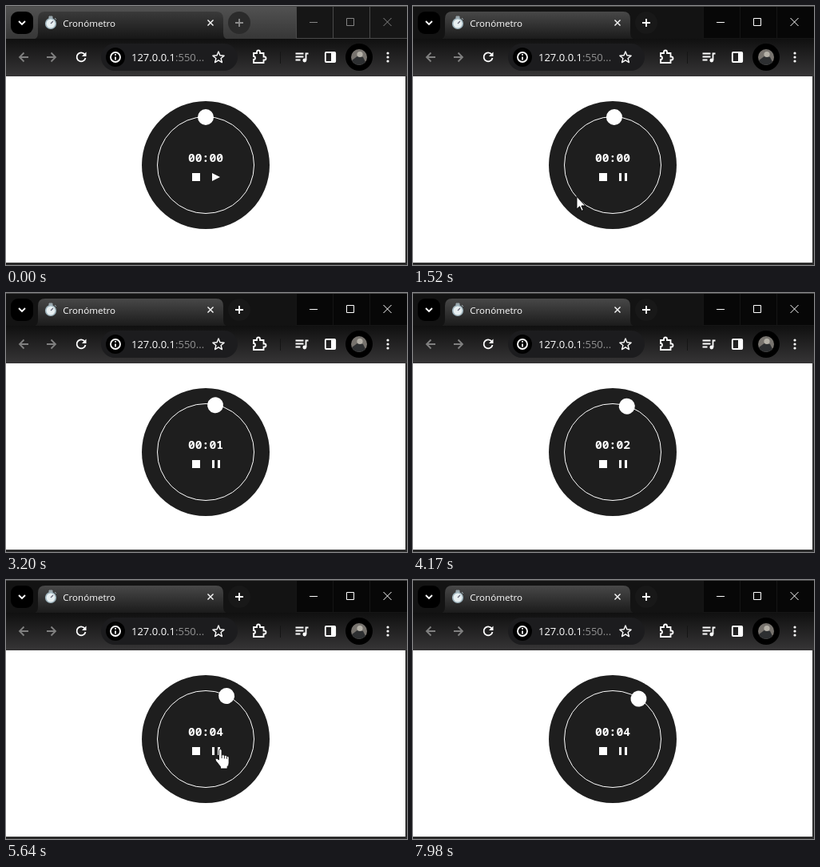
Write an HTML page that moves like this. It is 502 by 324 pixels and loops after 8 s.

```html
<!DOCTYPE html>
<html lang="es">
<head>
<meta charset="utf-8">
<title>Cronómetro</title>
<style>
  html, body { margin: 0; width: 100%; height: 100%; overflow: hidden; background: #fff; }
  svg { display: block; }
  text { font-family: "Open Sans", "Noto Sans", sans-serif; fill: #fff; }
  .line { fill: none; stroke: #fff; stroke-width: 1.8; }
  .thin { stroke-width: 1.4; }
  .dim { stroke: #808080; }
  #digits { font: 600 14.67px "Noto Sans Mono", monospace; }
  #strip { fill: #131313; }
  #tab { fill: url(#tabOn); }
  #plusDisc { fill: #181818; }
  #controls rect { fill: #070707; stroke: #151515; }
  #controls path { stroke-width: 1; }
  .blurred #strip { fill: url(#stripOff); }
  .blurred #tab { fill: url(#tabOff); }
  .blurred #plusDisc { fill: #2b2b2b; }
  .blurred #plus { stroke: #8c8c8c; }
  .blurred #controls rect { fill: #161616; stroke: #4a4a4a; }
  .blurred #controls path { stroke: #858585; }
</style>
</head>
<body>
<svg id="stage" width="502" height="324" viewBox="0 0 502 324">
  <defs>
    <linearGradient id="stripOff" x2="0" y2="1"><stop stop-color="#525252"/><stop offset="1" stop-color="#363636"/></linearGradient>
    <linearGradient id="tabOn" x2="0" y2="1"><stop stop-color="#484848"/><stop offset="1" stop-color="#1a1a1a"/></linearGradient>
    <linearGradient id="tabOff" x2="0" y2="1"><stop stop-color="#3a3a3a"/><stop offset="1" stop-color="#161616"/></linearGradient>
    <linearGradient id="bar" x2="0" y2="1"><stop stop-color="#101010"/><stop offset="1" stop-color="#363536"/></linearGradient>
  </defs>

  <!-- Tab strip -->
  <rect id="strip" width="502" height="42"/>
  <rect x="6" y="7" width="28" height="28" rx="9"/>
  <path class="line" d="M16 19l4 4 4-4"/>
  <path id="tab" d="M32 42q8 0 8-8V16q0-9 9-9H263q9 0 9 9V34q0 8 8 8z"/>
  <g id="watch">
    <path d="M54 13h4v3h-4zM61 15l2 2" fill="#9aa7ad" stroke="#9aa7ad"/>
    <circle cx="56" cy="22" r="6.3" fill="#e8f0f2" stroke="#9fb4bd" stroke-width="1.6"/>
    <path d="M56 22l3-3" stroke="#667" stroke-width="1.2"/>
  </g>
  <text x="71.300" y="26" font-size="11.6">Cronómetro</text>
  <path class="line thin" d="M252.500 17.500l7 7m0-7l-7 7"/>
  <circle id="plusDisc" cx="292" cy="21" r="14"/>
  <path class="line" id="plus" d="M287 21h10m-5-5v10"/>
  <g id="controls">
    <rect x="363.500" y="-.5" width="46" height="41"/>
    <rect x="409.500" y="-.5" width="46" height="41"/>
    <rect x="455.500" y="-.5" width="47" height="41"/>
    <path class="line" d="M380 20.500h10M426.500 15.500h9v9h-9zM472.500 15l10 10m0-10l-10 10"/>
  </g>
  <path d="M0 .5h502" stroke="#4a4a4a"/>

  <!-- Toolbar -->
  <rect y="41" width="502" height="47" fill="url(#bar)"/>
  <path class="line dim" d="M28 64H17m5.500-5.500L17 64l5.500 5.500M51 64h11m-5.500-5.500L62 64l-5.500 5.500"/>
  <path class="line" d="M98.500 60.500a5.500 5.500 0 1 0 1 4.500"/>
  <path d="M100.500 57.500v5.500h-5.500z" fill="#fff"/>
  <rect x="119" y="47" width="171" height="34" rx="17" fill="#1c1c1e"/>
  <circle cx="137" cy="64" r="12"/>
  <circle class="line" cx="137" cy="64" r="6"/>
  <path class="line" d="M137 63.500v4M137 60v1.700"/>
  <text x="157" y="69" font-size="13">127.0.0.1<tspan fill="#929292">:550...</tspan></text>
  <path class="line thin" stroke-linejoin="round" d="M266 57l1.900 4.800 5.200.4-4 3.300 1.300 5.100-4.400-2.800-4.400 2.800 1.300-5.100-4-3.300 5.200-.4z"/>
  <path class="line" d="M310 59h4v-1.500a2 2 0 0 1 4 0V59h4.500v4.500h1a2 2 0 0 1 0 4h-1v3.500H310v-4a2 2 0 0 0 0-4z"/>
  <path d="M343.500 57v15" stroke="#151515"/>
  <path class="line" d="M362.500 59.500h10M362.500 63.500h10M362.500 67.500h6M375.500 68V59.500h3"/>
  <circle cx="373.800" cy="68" r="2.400" fill="#fff"/>
  <rect class="line" x="399.800" y="58" width="12.400" height="12" rx="1"/>
  <path d="M407 58h5.500v12H407z" fill="#fff"/>
  <circle cx="442" cy="64" r="17"/>
  <circle cx="442" cy="64" r="10" fill="#77736e"/>
  <path d="M433 68a10 10 0 0 0 17 2l-3-6-6-2z" fill="#2d2f31"/>
  <circle cx="443" cy="60.500" r="3.600" fill="#b5b1a8"/>
  <g fill="#fff"><circle cx="478" cy="59" r="1.600"/><circle cx="478" cy="64" r="1.600"/><circle cx="478" cy="69" r="1.600"/></g>

  <!-- Page -->
  <path d="M0 88h500v233H0z" fill="#fff"/>
  <path d="M500 88h2v236H0v-3h500z" fill="#2b2b2b"/>
  <circle cx="250" cy="199" r="80" fill="#1e1e1e"/>
  <circle cx="250" cy="199" r="60.500" fill="none" stroke="#fff"/>
  <circle id="dot" cx="250" cy="139" r="10" fill="#fff"/>
  <text id="digits" x="228" y="195">00:00</text>
  <path d="M233 209h10v10h-10z" fill="#fff"/>
  <path id="toggle" fill="#fff"/>

  <!-- Pointer, with its hot spot at 0,0 -->
  <g id="pointer">
    <circle id="press" r="12" fill="#ff0" opacity=".5"/>
    <path id="arrow" fill="#fff" stroke="#000" d="M.5 .5v16l3.700-3.500 2.500 5.600 2.300-1-2.500-5.400h5z"/>
    <g id="hand" stroke="#000" stroke-width=".8">
      <path fill="#fff" d="M-.5 1.500q0-2 1.800-2t1.800 2V7q2-1 3.300.5 2-.8 3 .8 2.700-.4 2.700 2V17q0 3-2 4.500V24H1.500V21.500L-4.500 14q-1-2 .7-2.700 1.300-.3 3.300 1.700z"/>
      <path d="M3.100 7v4M6.400 7.500v4M9.400 8.300v3.500"/>
    </g>
  </g>
</svg>
<script>
  const LOOP = 8000, START = 1200, PAUSE = 5990, RESUME = 7120;
  const DEGREES_PER_MS = 0.0058;
  const PLAY_ICON = "M258 209l10 5-10 5z";
  const PAUSE_ICON = "M258 209h3v10h-3zM265 209h3v10h-3z";
  const presses = [[1130, 1240], [5830, 5990], [7070, 7200]];
  // Each visit: time, x, y
  const visits = [
    [[200, 312, 318], [900, 275, 216], [1080, 263, 216], [1270, 263, 216], [1760, 150, 258], [2700, 150, 258], [3200, 496, 326]],
    [[5220, 334, 314], [5580, 267, 212], [7220, 267, 212], [7860, 468, 326]]
  ];
  const el = id => document.getElementById(id);
  const show = (id, on) => el(id).setAttribute("visibility", on ? "visible" : "hidden");
  const within = (t, [from, to]) => t >= from && t < to;

  function pointerAt(t) {
    for (const path of visits)
      for (let i = 1; i < path.length; i++) {
        const [t0, x0, y0] = path[i - 1], [t1, x1, y1] = path[i];
        if (!within(t, [t0, t1])) continue;
        const p = (t - t0) / (t1 - t0), k = p * p * (3 - 2 * p);
        return [x0 + (x1 - x0) * k, y0 + (y1 - y0) * k];
      }
    return [-100, -100];
  }

  function draw(t) {
    el("stage").classList.toggle("blurred", t < 1170);

    const running = Math.max(0, Math.min(t, PAUSE) - START) + Math.max(0, t - RESUME);
    el("dot").setAttribute("transform", `rotate(${running * DEGREES_PER_MS} 250 199)`);
    const seconds = Math.max(0, Math.min(4, Math.floor((t - 1240) / 1046)));
    el("digits").textContent = "00:0" + seconds;
    const playing = within(t, [START, 6060]) || t >= RESUME;
    el("toggle").setAttribute("d", playing ? PAUSE_ICON : PLAY_ICON);

    const [x, y] = pointerAt(t);
    const overButton = Math.hypot(x - 263, y - 214) < 12;
    el("pointer").setAttribute("transform", `translate(${x} ${y})`);
    show("hand", overButton);
    show("arrow", !overButton);
    show("press", presses.some(span => within(t, span)));
  }

  const begin = performance.now();
  function tick() {
    draw((performance.now() - begin) % LOOP);
    requestAnimationFrame(tick);
  }
  tick();
</script>
</body>
</html>
```
